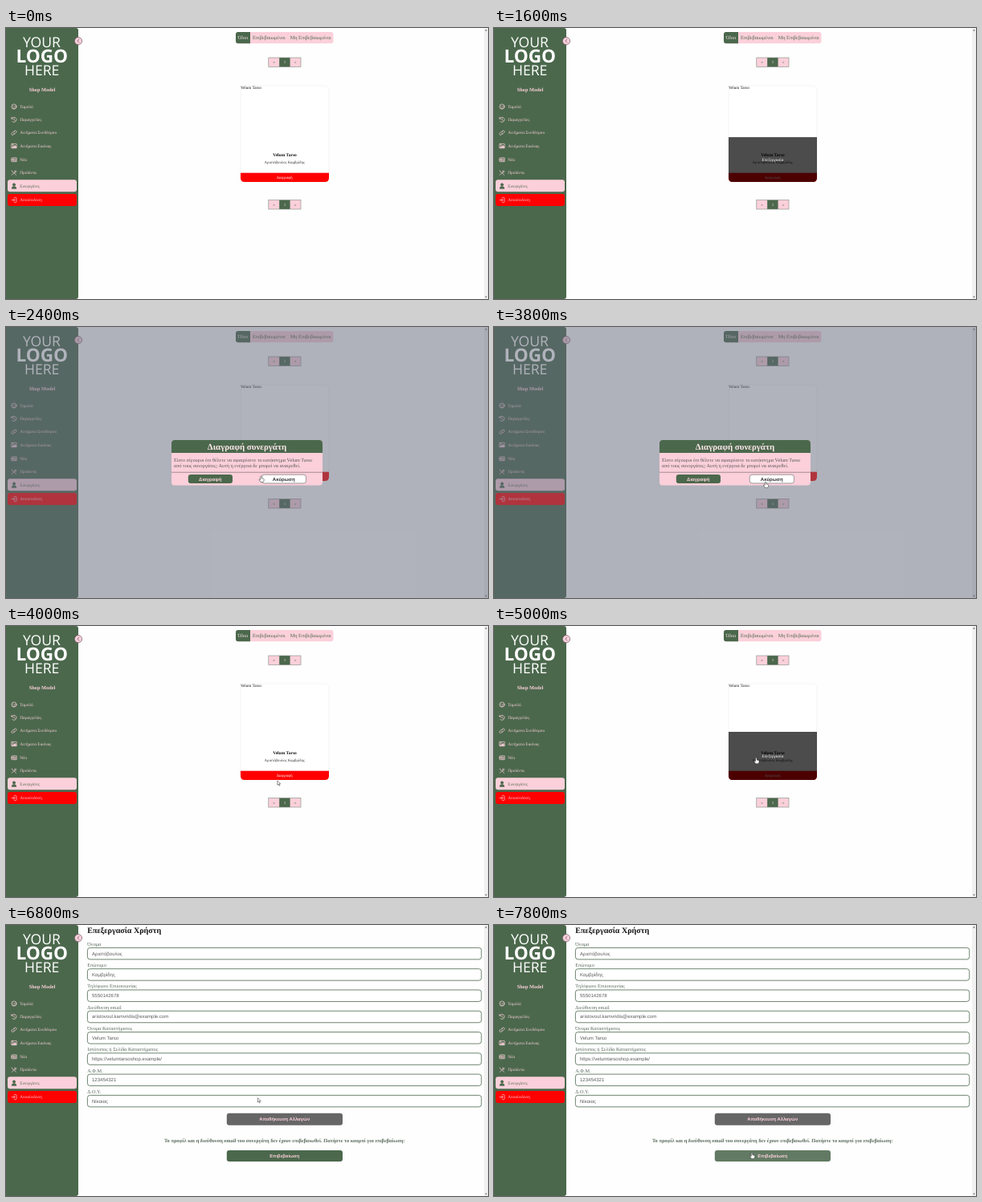
An HTML page that plays this animation: 600 by 338 pixels, repeating every 8000 ms.

```html
<!DOCTYPE html>
<html lang="el">
<head>
<meta charset="utf-8">
<title>Store admin</title>
<style>
  html, body { margin: 0; width: 100%; height: 100%; overflow: hidden; background: #fefefe; }
  #stage { display: block; width: 100vw; height: 100vh; }
  text { font-family: "Liberation Serif", "Times New Roman", serif; text-rendering: geometricPrecision; }
  .sans { font-family: "Liberation Sans", Arial, sans-serif; }
  .logo { font-family: "Open Sans", "Noto Sans", sans-serif; }
  .b { font-weight: 700; }
  .mid { text-anchor: middle; }
  .line { fill: none; stroke-width: .7; stroke-linecap: round; stroke-linejoin: round; }
</style>
</head>
<body>
<svg id="stage" viewBox="0 0 600 338" preserveAspectRatio="none"></svg>
<script>
const GREEN = '#4b684c', PINK = '#fbd0da', PALE = '#fde6ea', RED = '#ff0000', GRAY = '#666', LABEL = '#586a5b';
const LOOP = 8000;

const text = (x, y, size, fill, str, cls = '') =>
  `<text x="${x}" y="${y}" font-size="${size}" fill="${fill}" class="${cls}">${str}</text>`;
const rect = (x, y, w, h, fill, r = 0, extra = '') =>
  `<rect x="${x}" y="${y}" width="${w}" height="${h}" rx="${r}" fill="${fill}" ${extra}/>`;
const group = (id, body) => `<g id="${id}">${body}</g>`;

// Icons sit in a box of 7 by 7 around the origin.
const menu = [
  ['Ταμπλό', 98, '<circle r="3.1"/><path d="M0 .8L1.3-1M-1.9.6h.1M-1.2-1.3h.1M1.9.6h.1M-1.3 2.3h2.6"/>'],
  ['Παραγγελίες', 114.4, '<path d="M-2.8-1.6A3.1 3.1 0 1 1-2.1 2.3M-3.2-3v1.8h1.8M0-1.5V.2L1.2 1"/>'],
  ['Αιτήματα Συνδέσμου', 130.7, '<path d="M-.5-1.2L.7-2.4a1.4 1.4 0 0 1 2 2L1.3 1a1.4 1.4 0 0 1-2 0M.5 1.2L-.7 2.4a1.4 1.4 0 0 1-2-2L-1.3-1a1.4 1.4 0 0 1 2 0"/>'],
  ['Αιτήματα Εικόνας', 147.1, '<rect x="-3.3" y="-2.7" width="6.6" height="5.4" rx=".6"/><circle cx="-1.6" cy="-1.1" r=".5"/><path d="M-2.6 1.9l1.5-1.4.8.6 1.6-2L2.7 1.9z" fill="currentColor"/>'],
  ['Νέα', 164.3, '<path d="M-2.2-2.4h5.4v4.8h-5.6q-.9 0-.9-.9v-3h1.1v3M-1-1.1h1.4v1.2H-1zM1.6-1.1h.6M1.6.2h.6M-1 1.4h3.2"/>'],
  ['Προϊόντα', 180.7, '<path d="M-2.7 2.7L2.6-2.6M1-2.8L.9-1Q1.8 0 2.9-1M-2.8-2.8Q-2.4-.7-.5-.1L2.7 2.7"/>'],
  ['Συνεργάτες', 197.1, '<circle cy="-1.7" r="1.6" fill="currentColor"/><path d="M-2.8 3q0-2.5 2.8-2.5T2.8 3z" fill="currentColor"/>'],
  ['Αποσύνδεση', 214.5, '<path d="M.6-2.9h1.5q1 0 1 1v3.8q0 1-1 1H.6M-3 0h4M-.7-1.8L1.1 0-.7 1.8"/>']
];

const menuItem = ([label, y, icon], i) => {
  const ink = i === 6 ? GREEN : PINK;
  return `<g class="line" transform="translate(10 ${y})" stroke="${ink}" color="${ink}">${icon}</g>`
    + text(17.3, y + 1.7, 5.3, ink, label);
};

const sidebar =
  `<path d="M0 0H87q3 0 3 3V335q0 3-3 3H0z" fill="${GREEN}"/>`
  + text(44.5, 24.3, 17.6, '#fff', 'YOUR', 'logo mid')
  + text(44.7, 42.9, 22.6, '#fff', 'LOGO', 'logo mid b')
  + text(44.7, 59.3, 17.6, '#fff', 'HERE', 'logo mid')
  + text(45, 79.4, 6.3, PINK, 'Shop Model', 'mid b')
  + rect(2, 189.3, 86, 15, PINK, 3)
  + rect(2, 207, 86, 15, RED, 3)
  + menu.map(menuItem).join('')
  + `<circle cx="90" cy="16.2" r="4.6" fill="${PINK}" stroke="#6b5566" stroke-width=".7"/>`
  + `<path class="line" d="M90.9 14.2l-2 2 2 2" stroke="#5a4a5a"/>`;

const pager = y =>
  rect(326.8, y, 40.2, 11.4, PINK) + rect(340.2, y, 13.4, 11.4, GREEN)
  + rect(326.8, y, 40.2, 11.4, 'none', 0, 'stroke="#7d8a80" stroke-width=".6"')
  + text(333.5, y + 7.3, 5, GREEN, '«', 'mid') + text(346.9, y + 7.3, 5, PALE, '1', 'mid')
  + text(360.3, y + 7.3, 5, GREEN, '»', 'mid');

const list =
  rect(286, 5, 121.5, 14.2, PINK, 3)
  + `<path d="M304 5v14.2H289q-3 0-3-3V8q0-3 3-3z" fill="${GREEN}"/>`
  + text(295, 14.3, 6.3, PALE, 'Όλοι', 'mid')
  + text(327.3, 14.3, 6.3, GREEN, 'Επιβεβαιωμένοι', 'mid')
  + text(379.2, 14.3, 6.3, GREEN, 'Μη Επιβεβαιωμένοι', 'mid')
  + pager(37) + pager(214.6)
  + rect(292, 72, 110, 120, '#fff', 5, 'stroke="#ececec" stroke-width=".6"')
  + `<g clip-path="url(#card)">`
  + text(292, 75.8, 5.1, '#111', 'Velum Tarso')
  + text(347, 160, 5.5, '#111', 'Velum Tarso', 'mid b')
  + text(346.7, 169.2, 4.8, '#333', 'Αριστόβουλος Καμβρίδης', 'mid')
  + rect(292, 180.7, 110, 12, RED)
  + text(346.7, 187.9, 5, '#fff', 'Διαγραφή', 'mid')
  + `<g id="cover">${rect(292, 72, 110, 120, 'rgba(0,0,0,.7)', 0, 'id="shade"')}`
  + `<svg id="window" x="292" width="110">${text(55, 0, 5.2, '#fff', 'Επεξεργασία', 'mid')}</svg></g></g>`;

const fields = [
  ['Όνομα', 'Αριστόβουλος'],
  ['Επώνυμο', 'Καμβρίδης'],
  ['Τηλέφωνο Επικοινωνίας', '5550142678'],
  ['Διεύθυνση email', 'aristovoul.kamvridis@example.com'],
  ['Όνομα Καταστήματος', 'Velum Tarso'],
  ['Ιστότοπος ή Σελίδα Καταστήματος', 'https://velumtarsoshop.example/'],
  ['Α.Φ.Μ.', '123454321'],
  ['Δ.Ο.Υ.', 'Νίκαιας']
];

const field = ([label, value], i) => {
  const y = 28.4 + i * 26.28;
  return text(101.3, y - 2.5, 6.25, LABEL, label)
    + rect(101.4, y, 490.4, 14.5, '#fff', 3.2, `stroke="${GREEN}" stroke-width=".8"`)
    + text(107, y + 9.2, 6.05, '#5c5c5c', value, 'sans');
};

const form =
  text(101.3, 9.6, 10.05, '#111', 'Επεξεργασία Χρήστη', 'b')
  + fields.map(field).join('')
  + rect(274.8, 234.7, 144.2, 15, GRAY, 3)
  + text(346.7, 244.4, 5.85, PINK, 'Αποθήκευση Αλλαγών', 'sans mid b')
  + text(346.7, 271.1, 6.38, LABEL, 'Το προφίλ και η διεύθυνση email του συνεργάτη δεν έχουν επιβεβαιωθεί. Πατήστε το κουμπί για επιβεβαίωση:', 'mid b')
  + rect(274.8, 280.9, 144.2, 14.1, GREEN, 3, 'id="confirm"')
  + text(346.8, 290.1, 5.75, PINK, 'Επιβεβαίωση', 'sans mid b');

const dialog =
  rect(0, 0, 600, 338, 'rgba(98,104,122,.5)')
  + rect(206, 141, 188, 56.5, PINK, 4)
  + `<path d="M206 157v-12q0-4 4-4h180q4 0 4 4v12z" fill="${GREEN}"/>`
  + text(300, 152.7, 10.9, PALE, 'Διαγραφή συνεργάτη', 'mid b')
  + text(209, 167.7, 6.25, '#555', 'Είστε σίγουροι ότι θέλετε να αφαιρέσετε το κατάστημα Velum Tarso')
  + text(209, 174.8, 6.25, '#555', 'από τους συνεργάτες; Αυτή η ενέργεια δε μπορεί να αναιρεθεί.')
  + rect(206, 180.8, 188, .7, '#7d6f74')
  + rect(226.8, 184, 55.2, 11, GREEN, 3)
  + text(254.3, 191.6, 6, PINK, 'Διαγραφή', 'sans mid b')
  + rect(318.3, 184.2, 55.2, 10.7, '#fff', 3, 'stroke="#777" stroke-width=".7"')
  + text(345.7, 191.6, 6, '#333', 'Ακύρωση', 'sans mid b');

const scrollbar = rect(595, 0, 5, 338, '#f1f1f1')
  + '<path d="M596.2 3.4l1.3-1.7 1.3 1.7zM596.2 334.8l1.3 1.7 1.3-1.7z" fill="#555"/>';

const cursor = '<g stroke="#222" stroke-width=".5" stroke-linejoin="round" fill="#fff">'
  + '<path id="arrow" d="M0 0v5.4l1.3-1.2.9 2 .9-.4-.9-1.9h1.7z"/>'
  + '<path id="hand" d="M-.8.6q.8-1.2 1.6 0v2.2l2.2.5q.9.3.8 1.1L3.4 6.2 2.8 7.4H-.5L-2.4 4.6q-.2-1 .8-.7l.8.6z"/></g>';

const stage = document.getElementById('stage');
stage.innerHTML =
  '<clipPath id="card"><path d="M292 72h110v115q0 5-5 5H297q-5 0-5-5z"/></clipPath>'
  + rect(0, 0, 600, 338, '#fefefe') + scrollbar
  + group('list', list) + group('form', form) + sidebar
  + group('dialog', dialog) + group('cursor', cursor);

const $ = id => document.getElementById(id);
const show = (id, on) => $(id).setAttribute('display', on ? 'inline' : 'none');
const ramp = (t, start, length) => Math.min(1, Math.max(0, (t - start) / length));

// The CSS "ease" curve: cubic-bezier(.25, .1, .25, 1).
function ease(x) {
  const curve = (a, b, u) => 3 * a * u * (1 - u) ** 2 + 3 * b * u * u * (1 - u) + u ** 3;
  let lo = 0, hi = 1;
  for (let i = 0; i < 20; i++) {
    const u = (lo + hi) / 2;
    if (curve(.25, .25, u) < x) lo = u; else hi = u;
  }
  return curve(.1, 1, lo);
}

// Pointer stops: time, x, y.
const stops = [
  [1700, 318, 184], [2100, 317.5, 186], [2700, 317.5, 186], [3700, 338, 193],
  [4100, 337.8, 193], [4700, 328, 166], [5100, 326, 164], [5600, 305.8, 147.6],
  [6200, 305.8, 147.6], [7400, 320.7, 283.4], [7600, 321, 284]
];

function pointer(t) {
  const i = stops.findIndex(s => s[0] > t);
  if (i < 0) return stops[stops.length - 1].slice(1);
  const [t0, x0, y0] = stops[Math.max(0, i - 1)], [t1, x1, y1] = stops[i];
  const p = ramp(t, t0, t1 - t0 || 1), k = p * p * (3 - 2 * p);
  return [x0 + (x1 - x0) * k, y0 + (y1 - y0) * k];
}

function draw(t) {
  const onForm = t >= 5200, asking = t >= 2100 && t < 4000;
  show('list', !onForm);
  show('form', onForm);
  show('dialog', asking);
  $('dialog').setAttribute('opacity', ramp(t, 2080, 260));

  const lift = ease(ramp(t, 720, 500)) - ease(ramp(t, 1560, 500)) + ease(ramp(t, 4300, 500));
  const h = Math.max(0, 60 * lift), top = 192 - h;
  show('cover', h > .1);
  for (const id of ['shade', 'window']) {
    $(id).setAttribute('y', top);
    $(id).setAttribute('height', h);
  }
  $('window').firstChild.setAttribute('y', h / 2 + 1.5);

  const p = ramp(t, 7450, 300), mix = (a, b) => Math.round(a + (b - a) * p);
  $('confirm').setAttribute('fill', `rgb(${mix(75, 98)},${mix(104, 122)},${mix(76, 99)})`);

  const [x, y] = pointer(t);
  const hand = asking || (!onForm && y < 192) || y > 281;
  show('cursor', t >= 1700);
  show('hand', hand);
  show('arrow', !hand);
  $('cursor').setAttribute('transform', `translate(${x} ${y})`);
}

const start = performance.now();
function tick() {
  draw((performance.now() - start) % LOOP);
  requestAnimationFrame(tick);
}
tick();
</script>
</body>
</html>
```
